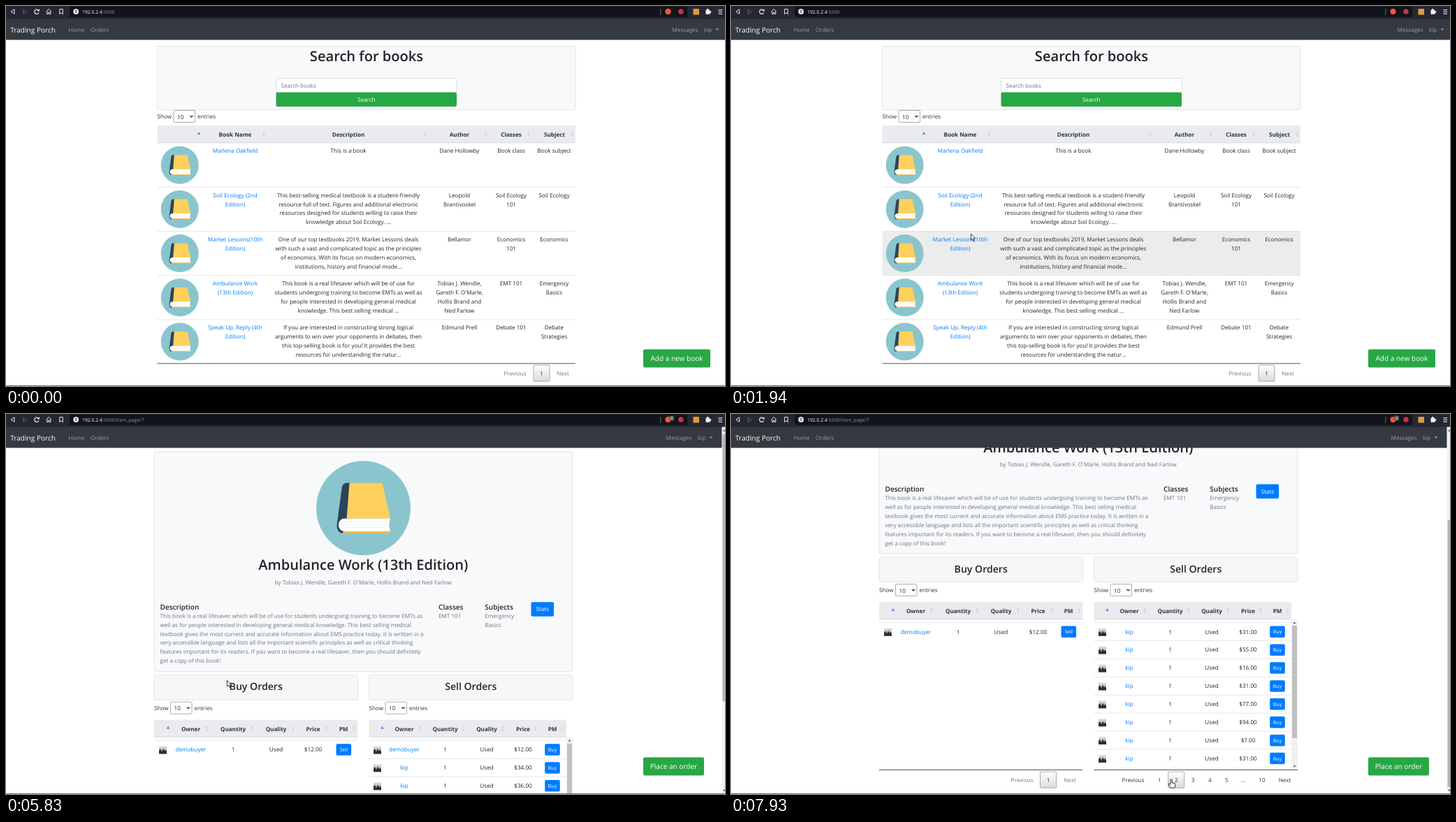
An HTML page with a canvas for the animation above (8000 ms loop, 1029 px wide and 544 px high).

```html
<!DOCTYPE html>
<html lang="en">
<head>
<meta charset="utf-8">
<title>Book trading site</title>
<style>
  html, body { margin: 0; width: 100%; height: 100%; overflow: hidden; background: #fff; }
  canvas { display: block; }
</style>
</head>
<body>
<canvas id="stage" width="1029" height="544"></canvas>
<script>
const ctx = document.getElementById('stage').getContext('2d');
const LOOP = 8000, NEW_PAGE = 4450;
const INK = '#212529', MUTED = '#6c757d', LINK = '#007bff', GREEN = '#28a745',
      LINE = '#dee2e6', HOVER = '#ebecec', CHROME = '#252733', NAV_TEXT = '#999c9f';
const HOST = '192.0.2.4', PORT = ':5000', PATH = '/item_page/7', USER = 'kip', OTHER_USER = 'demobuyer';

const books = [
  { title: ['Marlena Oakfield'], about: ['This is a book'], author: ['Dane Hollowby'],
    classes: ['Book class'], subject: ['Book subject'] },
  { title: ['Soil Ecology (2nd', 'Edition)'],
    about: ['This best-selling medical textbook is a student-friendly', 'resource full of text. Figures and additional electronic',
      'resources designed for students willing to raise their', 'knowledge about Soil Ecology. ...'],
    author: ['Leopold', 'Brantivoskel'], classes: ['Soil Ecology', '101'], subject: ['Soil Ecology'] },
  { title: ['Market Lessons(10th', 'Edition)'],
    about: ['One of our top textbooks 2019, Market Lessons deals', 'with such a vast and complicated topic as the principles',
      'of economics. With its focus on modern economics,', 'institutions, history and financial mode...'],
    author: ['Bellamor'], classes: ['Economics', '101'], subject: ['Economics'] },
  { title: ['Ambulance Work', '(13th Edition)'],
    about: ['This book is a real lifesaver which will be of use for', 'students undergoing training to become EMTs as well as',
      'for people interested in developing general medical', 'knowledge. This best selling medical ...'],
    author: ['Tobias J. Wendle,', "Gareth F. O'Marle,", 'Hollis Brand and', 'Ned Farlow'],
    classes: ['EMT 101'], subject: ['Emergency', 'Basics'] },
  { title: ['Speak Up, Reply (4th', 'Edition)'],
    about: ['If you are interested in constructing strong logical', 'arguments to win over your opponents in debates, then',
      'this top-selling book is for you! It provides the best', 'resources for understanding the natur...'],
    author: ['Edmund Prell'], classes: ['Debate 101'], subject: ['Debate', 'Strategies'] }
];
const fullText = [
  'This book is a real lifesaver which will be of use for students undergoing training to become EMTs as',
  'well as for people interested in developing general medical knowledge. This best selling medical',
  'textbook gives the most current and accurate information about EMS practice today. It is written in a',
  'very accessible language and lists all the important scientific principles as well as critical thinking',
  'features important for its readers. If you want to become a real lifesaver, then you should definitely',
  'get a copy of this book!'
];
const pricePages = [[12, 34, 36, 89, 36, 40, 36, 36], [31, 55, 16, 31, 77, 94, 7, 31]];

// Keys are [time, x, y] for the pointer and [time, offset] for the page scroll.
const pointerKeys = [
  [150, 986, 530], [220, 895, 524], [300, 760, 450], [450, 560, 350], [600, 430, 285], [750, 345, 245],
  [910, 307, 227], [1080, 306, 226], [1400, 325, 255], [1790, 343, 310], [1870, 344, 324], [1940, 343, 326],
  [2030, 342, 327], [2180, 339, 345], [2420, 327, 388], [2510, 324, 394], [5150, 324, 394], [5530, 316, 381],
  [7070, 316, 381], [7300, 420, 384], [7450, 530, 391], [7600, 600, 450], [7750, 628, 510], [7840, 630, 523]
];
const scrollKeys = [
  [5780, -3], [5830, 0], [5910, 20], [5990, 42], [6140, 76], [6270, 109], [6400, 138], [6530, 156], [6680, 167], [6760, 169]
];

function track(keys, t) {
  const next = keys.findIndex(k => k[0] > t);
  if (next === 0) return keys[0].slice(1);
  if (next < 0) return keys[keys.length - 1].slice(1);
  const a = keys[next - 1], b = keys[next], p = (t - a[0]) / (b[0] - a[0]);
  return a.slice(1).map((v, i) => v + (b[i + 1] - v) * p);
}

function text(s, x, y, color = INK, align = 'left', size = 8.1, weight = 400) {
  ctx.font = `${weight} ${size}px "Open Sans", "Noto Sans", sans-serif`;
  ctx.textAlign = align;
  ctx.fillStyle = color;
  ctx.fillText(s, x, y);
}
const centered = (s, x, y, color, size, weight) => text(s, x, y, color, 'center', size, weight);
const lines = (list, x, y, color, align) => list.forEach((s, i) => text(s, x, y + i * 12.9, color, align));

function rect(x, y, w, h, fill) {
  ctx.fillStyle = fill;
  ctx.fillRect(x, y, w, h);
}
function box(x, y, w, h, fill, border, radius = 2) {
  ctx.beginPath();
  ctx.roundRect(x, y, w, h, radius);
  ctx.fillStyle = fill;
  ctx.fill();
  if (border) stroke(border, 0.8);
}
function stroke(color, width = 1) {
  ctx.strokeStyle = color;
  ctx.lineWidth = width;
  ctx.stroke();
}
function disc(x, y, r, fill) {
  ctx.beginPath();
  ctx.arc(x, y, r, 0, 7);
  ctx.fillStyle = fill;
  ctx.fill();
}
function polygon(points, fill) {
  ctx.beginPath();
  points.forEach(p => ctx.lineTo(...p));
  ctx.closePath();
  if (fill) { ctx.fillStyle = fill; ctx.fill(); }
}
const triangle = (x, y, w, h, fill) => polygon([[x - w, y + h], [x + w, y + h], [x, y - h]], fill);
function shape(d, fill, border, width) {
  const p = new Path2D(d);
  if (fill) { ctx.fillStyle = fill; ctx.fill(p); }
  if (border) { ctx.strokeStyle = border; ctx.lineWidth = width; ctx.stroke(p); }
}
function at(x, y, scale, draw) {
  ctx.save();
  ctx.translate(x, y);
  ctx.scale(scale, scale);
  draw();
  ctx.restore();
}
function vertical(y, h, top, bottom) {
  const g = ctx.createLinearGradient(0, y, 0, y + h);
  g.addColorStop(0, top);
  g.addColorStop(1, bottom);
  return g;
}

function bookIcon(x, y, r) {
  at(x, y, r / 67.5, () => {
    disc(0, 0, 67.5, '#8ac5cd');
    shape('M-19-36C-28-37-30-34-31-28L-38 24C-38 32-35 36-29 36L-20 30Z', '#2c435c');
    shape('M-20-36H27L38.5 15H-24Z', '#ffd05c');
    shape('M-28 32H38.5V36H-30Z', '#f0bd4d');
    shape('M-28 15H38.5Q35 24 38.5 33H-28C-38 32-38 16-28 15Z', '#fff');
    shape('M-31 20H35M-32 24H35M-31 28H35', null, '#e6eaec', 0.8);
  });
}

function photo(x, y) {
  rect(x, y, 11, 11, vertical(y, 11, '#e4e4e4', '#8e8e8e'));
  polygon([[x, y + 11], [x, y + 6], [x + 2, y + 4], [x + 4, y + 8], [x + 6, y + 3.5],
    [x + 8, y + 7], [x + 9.5, y + 5], [x + 11, y + 8], [x + 11, y + 11]], '#2e2e2e');
}

function button(label, x, y, w, h, fill, size = 8.1) {
  box(x, y, w, h, fill);
  centered(label, x + w / 2, y + h / 2 + size * 0.35, '#fff', size);
}

function showEntries(x, y) {
  text('Show', x, y, '#333');
  box(x + 23.5, y - 11.5, 30.5, 17, '#fff', '#999', 1.5);
  text('10', x + 28.5, y + 0.5, '#222');
  ctx.beginPath();
  ctx.moveTo(x + 47, y - 4);
  ctx.lineTo(x + 49, y - 2);
  ctx.lineTo(x + 51, y - 4);
  stroke('#222', 1.2);
  text('entries', x + 57.5, y, '#333');
}

function tableHead(x, y, w, sortX, columns) {
  rect(x, y, w, 25, '#e9ebee');
  rect(x, y + 24.5, w, 0.8, '#d4d8dc');
  triangle(sortX, y + 11, 2.3, 1.9, '#7777ee');
  for (const [label, cx, iconX] of columns) {
    centered(label, cx, y + 16, '#30353a', 8.1, 700);
    triangle(iconX, y + 10.5, 1.9, 1.6, '#d0d3d8');
    triangle(iconX, y + 15, 1.9, -1.6, '#d0d3d8');
  }
}

function pageButton(label, x, y, state) {
  if (state === 'current') box(x - 11.5, y - 14.8, 23, 23, vertical(y - 15, 23, '#fff', '#dcdcdc'), '#979797', 1);
  if (state === 'hover') box(x - 11.5, y - 14.8, 23, 23, vertical(y - 15, 23, '#585858', '#111'), '#111', 1);
  centered(label, x, y, { hover: '#fff', off: '#777' }[state] || '#333');
}

function listPage(t, px, py) {
  box(216.5, 57.5, 598.5, 91, '#f8f9fb', '#dcdee0');
  centered('Search for books', 516, 79.3, INK, 20.1, 600);
  box(386.5, 103.5, 258.5, 21, '#fff', '#ced4da');
  text('Search books', 393.5, 117, MUTED);
  button('Search', 386.5, 123.5, 258.5, 20.5, GREEN);
  showEntries(216.5, 161);
  tableHead(216.5, 171, 598.5, 276, [['Book Name', 328, 369], ['Description', 490, 600],
    ['Author', 649, 687], ['Classes', 723, 748], ['Subject', 785, 810]]);

  const hoveredRow = t >= 150 && px > 216 && px < 815 ? Math.floor((py - 196) / 63.2) : -1;
  const linkHover = t >= 2420;
  books.forEach((b, i) => {
    const top = 196 + i * 63.2, y = top + 14.4;
    if (i === hoveredRow) rect(216.5, top, 598.5, 63.2, HOVER);
    if (i) rect(216.5, top - 0.3, 598.5, 0.8, LINE);
    bookIcon(248.7, top + 31.7, 27);
    const active = i === 3 && linkHover, color = active ? '#0056b3' : LINK;
    lines(b.title, 328, y, color, 'center');
    if (active) b.title.forEach((s, k) => {
      const w = ctx.measureText(s).width;
      rect(328 - w / 2, y + k * 12.9 + 1, w, 0.7, color);
    });
    lines(b.about, 490, y, INK, 'center');
    lines(b.author, 649, y, INK, 'center');
    lines(b.classes, 723, y, INK, 'center');
    lines(b.subject, 784.5, y, INK, 'center');
  });
  rect(216.5, 511.3, 598.5, 1, '#555');
  pageButton('Previous', 728.5, 529, 'off');
  pageButton('1', 766.5, 529, 'current');
  pageButton('Next', 797, 529, 'off');
  button('Add a new book', 912, 491.5, 96, 26, GREEN, 10.07);
}

function orderRow(y, columns, owner, quantity, price, action) {
  const [photoX, ownerX, quantityX, qualityX, priceX, actionX] = columns;
  photo(photoX, y - 5);
  centered(owner, ownerX, y + 2.8, LINK);
  centered(quantity, quantityX, y + 2.8);
  centered('Used', qualityX, y + 2.8);
  centered(`$${price}.00`, priceX, y + 2.8);
  button(action, actionX - 10.8, y - 8.2, 21.6, 16.5, LINK, 7);
}

function orderPanel(x, title, sortX, headWidth, columns) {
  box(x, 374, 291.5, 35.5, '#f7f7f7', '#dedede');
  centered(title, x + 145.7, 395.7, INK, 14.1, 600);
  showEntries(x, 424);
  tableHead(x, 438, headWidth, sortX, columns);
  rect(x, 467, headWidth, 0.8, LINE);
}

function detailPage(t, px, py) {
  const [scroll] = track(scrollKeys, t);
  const secondPage = t >= 7930;
  ctx.save();
  ctx.translate(0, -scroll);

  box(212.3, 54.3, 598.5, 314.7, '#f8f9fb', '#dcdee0');
  bookIcon(511.5, 135, 67.5);
  centered(books[3].title.join(' '), 511.3, 223.7, INK, 20.1, 600);
  centered('by ' + books[3].author.join(' '), 511.3, 244.3, MUTED);
  text('Description', 220.5, 280, INK, 'left', 10.07, 600);
  lines(fullText, 220.5, 292, MUTED);
  text('Classes', 619, 280, INK, 'left', 10.07, 600);
  lines(books[3].classes, 619, 292, MUTED);
  text('Subjects', 685.3, 280, INK, 'left', 10.07, 600);
  lines(books[3].subject, 685.3, 292, MUTED);
  button('Stats', 751.5, 269.5, 32.5, 20.5, LINK);

  orderPanel(212, 'Buy Orders', 232, 291.5, [['Owner', 264.5, 287], ['Quantity', 325, 352],
    ['Quality', 386.5, 411], ['Price', 439.5, 459], ['PM', 483, 498]]);
  orderRow(480.7, [219, 264.5, 325, 386.5, 439.5, 483.3], OTHER_USER, 1, 12, 'Sell');
  rect(212, 678, 291.5, 1, '#555');
  pageButton('Previous', 416.5, 696, 'off');
  pageButton('1', 454, 696, 'current');
  pageButton('Next', 485, 696, 'off');

  orderPanel(519.5, 'Sell Orders', 538.5, 282.5, [['Owner', 570, 592], ['Quantity', 628.5, 655],
    ['Quality', 688, 711], ['Price', 740, 758], ['PM', 782, 797]]);
  const overTable = px > 520 && px < 802 && py < 508;
  const hoveredRow = overTable ? Math.floor((py + scroll - 467.7) / 25.9) : -1;
  pricePages[+secondPage].forEach((price, i) => {
    const top = 467.7 + i * 25.9;
    if (i === hoveredRow) rect(519.5, top, 282.5, 25.9, HOVER);
    if (i) rect(519.5, top - 0.4, 282.5, 0.8, LINE);
    orderRow(top + 13, [526, 570, 628.5, 688, 740, 782], i || secondPage ? USER : OTHER_USER,
      !secondPage && i === 3 ? 4 : 1, price, 'Buy');
  });
  rect(802, 463, 9, 215, '#f1f1f1');
  rect(803, 472, 7, 161, '#c1c1c1');
  triangle(806.5, 467.8, 2, 1.2, '#555');
  triangle(806.5, 673.5, 2, -1.2, '#555');
  rect(519.5, 678, 291.5, 1, '#555');
  const overSecond = t >= 7740 && !secondPage;
  pageButton('Previous', 575.5, 696, secondPage ? '' : 'off');
  pageButton('1', 613, 696, secondPage ? '' : 'current');
  pageButton('2', 637.2, 696, secondPage ? 'current' : overSecond ? 'hover' : '');
  [['3', 661], ['4', 685.3], ['5', 709.3], ['...', 733], ['10', 760], ['Next', 792.5]]
    .forEach(([label, x]) => pageButton(label, x, 696));
  ctx.restore();

  button('Place an order', 912, 491.5, 87, 26, GREEN, 10.07);
  rect(1024.5, 19, 5, 525, '#f1f1f1');
  rect(1025.5, 29 + scroll * 0.727, 4, 382, '#b5b5b5');
  triangle(1028, 23.5, 2, 1.2, '#555');
  triangle(1028, 539, 2, -1.2, '#555');
}

function navbar(onDetail) {
  const shift = onDetail ? -9 : 0;
  rect(0, 18, onDetail ? 1024.5 : 1029, 30.5, '#343a40');
  text('Trading Porch', 6.3, 37.6, '#fff', 'left', 10.07);
  text('Home', 89.5, 36.8, NAV_TEXT);
  text('Orders', 121, 36.8, NAV_TEXT);
  text('Messages', 990.5 + shift, 36.8, NAV_TEXT, 'right');
  text(USER, 999 + shift, 36.8, NAV_TEXT);
  triangle(1018 + shift, 33.7, 2.4, -1.2, NAV_TEXT);
}

function toolbar(t) {
  const loading = t >= 2820 && t < 4680;
  rect(0, 0, 1029, 18.5, CHROME);
  box(91, 0.5, 884, 15.5, '#12131b', null, 2);
  polygon([[7, 8], [12, 4.8], [12, 11.2]]);
  stroke('#e4e4e8');
  polygon([[29.5, 8], [24.5, 4.8], [24.5, 11.2]]);
  stroke('#5c5e69');
  if (loading) shape('M41 4.5L47.5 11.5M47.5 4.5L41 11.5', null, '#fff', 1.2);
  else {
    ctx.beginPath();
    ctx.arc(44, 8.2, 3.2, 0.4, 5.4);
    stroke('#f0f0f2', 1.2);
    polygon([[47.8, 4], [47.8, 7.6], [44.4, 7.6]], '#f0f0f2');
  }
  shape('M57.5 8.2L61.3 4.5L65.1 8.2M58.8 7.5V11.6H60.4V9.3H62.2V11.6H63.8V7.5', null, '#e8e8ec', 1);
  shape('M76.7 4.5H81.3V11.7L79 9.6L76.7 11.7Z', null, '#e8e8ec', 1);
  disc(100.2, 8, 3.9, '#f2f2f4');
  rect(99.6, 5.6, 1.2, 3, '#12131b');
  rect(99.6, 9.2, 1.2, 1.2, '#12131b');

  text(HOST, 109, 10.7, '#fff', 'left', 6.86);
  const hostWidth = ctx.measureText(HOST).width;
  text(PORT + (t >= 4300 ? PATH : ''), 109 + hostWidth, 10.7, '#92949c', 'left', 6.86);

  rect(936.5, 4, 0.8, 9, '#8a8b92');
  disc(947.5, 8, 4.2, '#f2582b');
  if (t >= NEW_PAGE) {
    box(949.5, 2.5, 6.5, 7, '#5a5d6b', null, 1.5);
    centered('8', 952.8, 8, '#fff', 5.2);
  }
  disc(966, 8, 3.8, '#c9344a');
  rect(983.5, 4, 8.5, 8.5, '#e69a35');
  rect(1001.5, 5.8, 6, 6, '#f0f0f2');
  disc(1004.2, 5.4, 1.6, '#f0f0f2');
  disc(1007.7, 8.6, 1.6, '#f0f0f2');
  for (let i = 0; i < 3; i++) rect(1019.5, 5 + i * 2.8, 5.5, 1.1, '#f0f0f2');
}

function statusBar(t) {
  if (t < 2420 || t > 5250) return;
  ctx.globalAlpha = Math.min(1, (5250 - t) / 260);
  rect(0, 532, 342, 11.5, CHROME);
  text(t < 4300 ? HOST + PORT + PATH : `Waiting for ${HOST}...`, 1, 540.2, '#f0f0f2', 'left', 6.1);
  ctx.globalAlpha = 1;
}

function pointer(t, x, y) {
  if (t < 150) return;
  const hand = (t >= 2420 && t < NEW_PAGE) || t >= 7740;
  at(x, y, 1, () => hand
    ? shape('M-1 1a1.1 1.1 0 0 1 2.2 0v4l3.6.8q1.3.4 1.2 1.7l-.6 3.6q-.2 1.2-1.2 1.2h-4q-.8 0-1.3-.8l-2.5-4q-.4-1.3.7-1.3l1.9 1.2z', '#fff', '#111', 0.9)
    : shape('M.4.3V9.2L2.4 7.4L3.8 10.5L5.2 9.9L3.9 6.9L6.5 6.7Z', '#fff', '#111', 0.8));
}

function draw() {
  const t = performance.now() % LOOP;
  const [px, py] = track(pointerKeys, t);
  const onDetail = t >= NEW_PAGE;
  ctx.textRendering = 'geometricPrecision';
  rect(0, 0, 1029, 544, '#fff');
  (onDetail ? detailPage : listPage)(t, px, py);
  navbar(onDetail);
  toolbar(t);
  statusBar(t);
  rect(0, 543, 1029, 1, '#74777d');
  pointer(t, px, py);
  requestAnimationFrame(draw);
}
draw();
</script>
</body>
</html>
```
